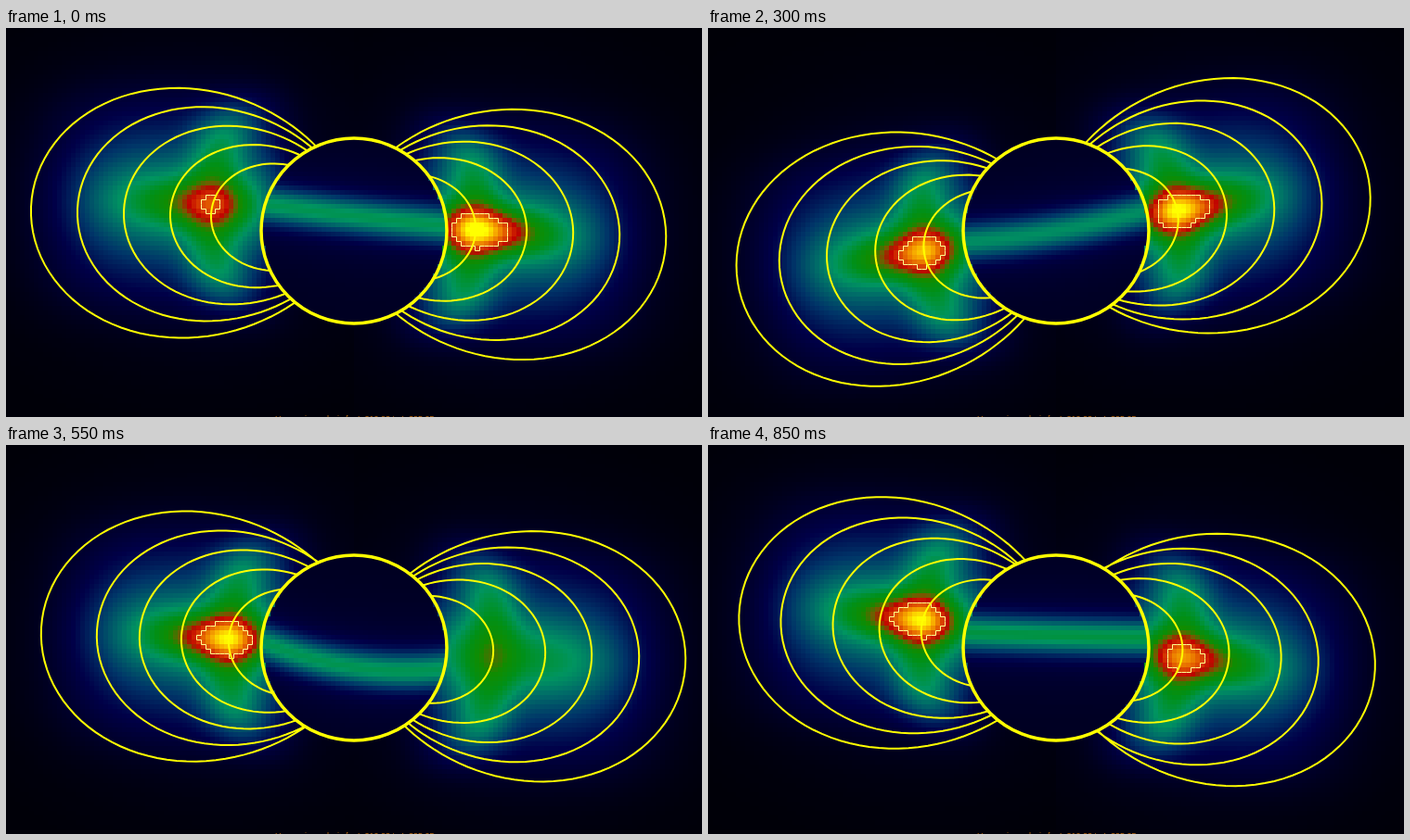
An HTML page with a canvas for the animation above (0.9 s loop, 750 by 420 pixels).

```html
<!DOCTYPE html>
<html lang="en">
<head>
<meta charset="utf-8">
<title>Radiation belts</title>
<style>
html, body { margin: 0; width: 100%; height: 100%; overflow: hidden; background: #000; }
canvas { display: block; }
</style>
</head>
<body>
<canvas id="stage" width="750" height="420"></canvas>
<script>
const PERIOD = 900, STEP = 50, CELL = 5, COLS = 150, ROWS = 84;
const CX = 375, CY = 219, RADIUS = 100, CONTOUR = 0.83;
const SHELLS = [350, 300, 250, 200, 150];

// time, tilt / 1000, dipole y, hot spot y, hot spot peak, x offset of each shell.
// The right side shows the left side half a turn later, mirrored.
const BELT = [
  [0, 42, 207.7, 190, 0.9, -2, -2, -2, -2, 4],
  [100, -68, 215.3, 228, 0.73, 7, 7, 6, 6, 0],
  [200, -147, 224.3, 242, 1.07, 3, 2, 2, 1, -5],
  [300, -156, 220, 241, 1, -7, -3, -4, -6, -8],
  [350, -129, 215.5, 238, 1.04, -11, -7, -7, -13, -14],
  [400, -123, 208.5, 229, 0.96, -7, -18, -8, -14, -14],
  [450, -68, 210, 218, 1.07, -14, -14, -14, -14, -19],
  [550, 61, 218.2, 209, 1.04, -13, -23, -19, -14, -15],
  [650, 105, 217.9, 205, 1.04, -20, -16, -17, -13, -18],
  [750, 173, 224.7, 197, 1.05, -13, -15, -16, -17, -19],
  [800, 138, 217, 193, 1.04, -13, -19, -15, -10, -10],
  [850, 107, 212.3, 189, 1.04, -9, -4, -10, -10, -5]
];
// time, y of the band in front of the planet at left, middle and right, strength
const BAND = [
  [0, 192, 203, 212, 0.36],
  [200, 200, 188, 192, 0.28],
  [350, 245, 235, 205, 0.35],
  [450, 238, 242, 238, 0.37],
  [550, 218, 240, 243, 0.36],
  [750, 200, 212, 218, 0.36],
  [850, 203, 206, 208, 0.38]
];
// level, red, green, blue
const PALETTE = [
  [0, 0, 0, 6], [0.08, 0, 0, 38], [0.18, 0, 0, 72], [0.3, 0, 52, 104],
  [0.42, 0, 108, 104], [0.5, 0, 148, 96], [0.59, 0, 144, 24], [0.66, 16, 140, 0],
  [0.72, 116, 92, 0], [0.77, 192, 0, 0], [0.86, 226, 90, 0], [0.94, 248, 175, 0], [1, 255, 255, 0]
];

const ctx = document.getElementById("stage").getContext("2d");
const grid = document.createElement("canvas");
grid.width = COLS;
grid.height = ROWS;
const gridCtx = grid.getContext("2d");
const image = gridCtx.createImageData(COLS, ROWS);
const field = new Float32Array(COLS * ROWS);

const bell = (v, width, power = 2) => Math.exp(-Math.pow(Math.abs(v / width), power));

function mix(a, b, pos) {
  const k = Math.min(1, Math.max(0, (pos - a[0]) / (b[0] - a[0])));
  return a.slice(1).map((v, i) => v + (b[i + 1] - v) * k);
}

function sample(rows, time) {
  time %= PERIOD;
  const next = rows.findIndex(row => row[0] > time);
  if (next > 0) return mix(rows[next - 1], rows[next], time);
  return mix(rows[rows.length - 1], [PERIOD, ...rows[0].slice(1)], time);
}

const colours = Array.from({ length: 512 }, (_, i) => {
  const level = i / 511;
  const next = Math.max(1, PALETTE.findIndex(row => row[0] >= level));
  return mix(PALETTE[next - 1], PALETTE[next], level);
});

function beltAt(time) {
  const [tilt, y, spotY, peak, ...shift] = sample(BELT, time);
  return { tilt: tilt / 1000, y, spotY, peak, shift };
}

function beltLevel(belt, outward, y) {
  const dx = outward - SHELLS[4] - belt.shift[4], dy = y - belt.spotY;
  const u = dx - dy * belt.tilt, v = dy + dx * belt.tilt;
  const halo = 0.24 * bell(v, 115, 4) * bell(u, u > 0 ? 165 : 80, 4);
  const haze = 0.1 * bell(v, 150) * bell(u - 20, 190);
  const disc = 0.3 * bell(v, 55) * bell(u, u > 0 ? 150 : 80, 4);
  const crescent = 0.31 * bell(u + 0.0018 * v * v, 38) * bell(v, 110, 6);
  const spot = Math.max(0, belt.peak - 0.71) * bell(u, u > 0 ? 68 : 38) * bell(v, 24);
  return halo + haze * (1 - halo / 0.24) + Math.hypot(disc, crescent) + spot;
}

function bandLevel([left, middle, right, strength], x, y) {
  const p = (x - CX) / 85;
  const dy = y - (middle + p * (right - left) / 2 + p * p * ((left + right) / 2 - middle));
  return 0.07 + strength * bell(dy, 20) + 0.09 * bell(dy, 50);
}

function drawField(sides, band) {
  for (let i = 0; i < field.length; i++) {
    const x = (i % COLS + 0.5) * CELL, y = (Math.floor(i / COLS) + 0.5) * CELL;
    const inside = Math.hypot(x - CX, y - CY) < RADIUS - 1;
    field[i] = inside ? bandLevel(band, x, y)
      : beltLevel(sides[x < CX ? 0 : 1], Math.abs(x - CX), y);
    const level = Math.min(511, Math.round(field[i] * 511));
    image.data.set([...colours[level], 255], i * 4);
  }
  gridCtx.putImageData(image, 0, 0);
  ctx.imageSmoothingEnabled = false;
  ctx.drawImage(grid, 0, 0, COLS * CELL, ROWS * CELL);
}

function drawContour() {
  ctx.beginPath();
  for (let i = 0; i < field.length - COLS; i++) {
    const x = i % COLS * CELL + 0.5, y = Math.floor(i / COLS) * CELL + 0.5;
    const hot = field[i] > CONTOUR;
    if (hot !== field[i + 1] > CONTOUR) {
      ctx.moveTo(x + CELL, y);
      ctx.lineTo(x + CELL, y + CELL);
    }
    if (hot !== field[i + COLS] > CONTOUR) {
      ctx.moveTo(x, y + CELL);
      ctx.lineTo(x + CELL, y + CELL);
    }
  }
  ctx.strokeStyle = "#ffff90";
  ctx.lineWidth = 1;
  ctx.stroke();
}

// Dipole lines r = L cos² latitude, tilted and shifted
function drawLines(belt, dir) {
  ctx.beginPath();
  SHELLS.forEach((shell, i) => {
    for (let deg = -66; deg <= 66; deg += 1.5) {
      const lat = deg * Math.PI / 180, r = shell * Math.cos(lat) ** 2;
      const u = r * Math.cos(lat), v = r * Math.sin(lat);
      const x = CX + dir * (u + v * belt.tilt + belt.shift[i]);
      const y = belt.y + v - u * belt.tilt;
      if (deg === -66) ctx.moveTo(x, y);
      else ctx.lineTo(x, y);
    }
  });
  ctx.stroke();
}

function draw(time) {
  const sides = [beltAt(time), beltAt(time + PERIOD / 2)];
  drawField(sides, sample(BAND, time));
  drawContour();

  ctx.strokeStyle = "#ff0";
  ctx.lineWidth = 2;
  ctx.save();
  ctx.beginPath();
  ctx.rect(0, 0, 750, 420);
  ctx.arc(CX, CY, RADIUS, 0, 2 * Math.PI);
  ctx.clip("evenodd");
  drawLines(sides[0], -1);
  drawLines(sides[1], 1);
  ctx.restore();

  ctx.lineWidth = 3.5;
  ctx.beginPath();
  ctx.arc(CX, CY, RADIUS, 0, 2 * Math.PI);
  ctx.stroke();

  ctx.fillStyle = "#c87010";
  ctx.font = "9px 'Liberation Sans', sans-serif";
  ctx.fillText("Harmonic analysis for L 210.02 to L 295.05", 290, 425);
}

let shown = -1;
function tick() {
  const time = Math.floor(performance.now() % PERIOD / STEP) * STEP;
  if (time !== shown) draw(shown = time);
  requestAnimationFrame(tick);
}
tick();
</script>
</body>
</html>
```
